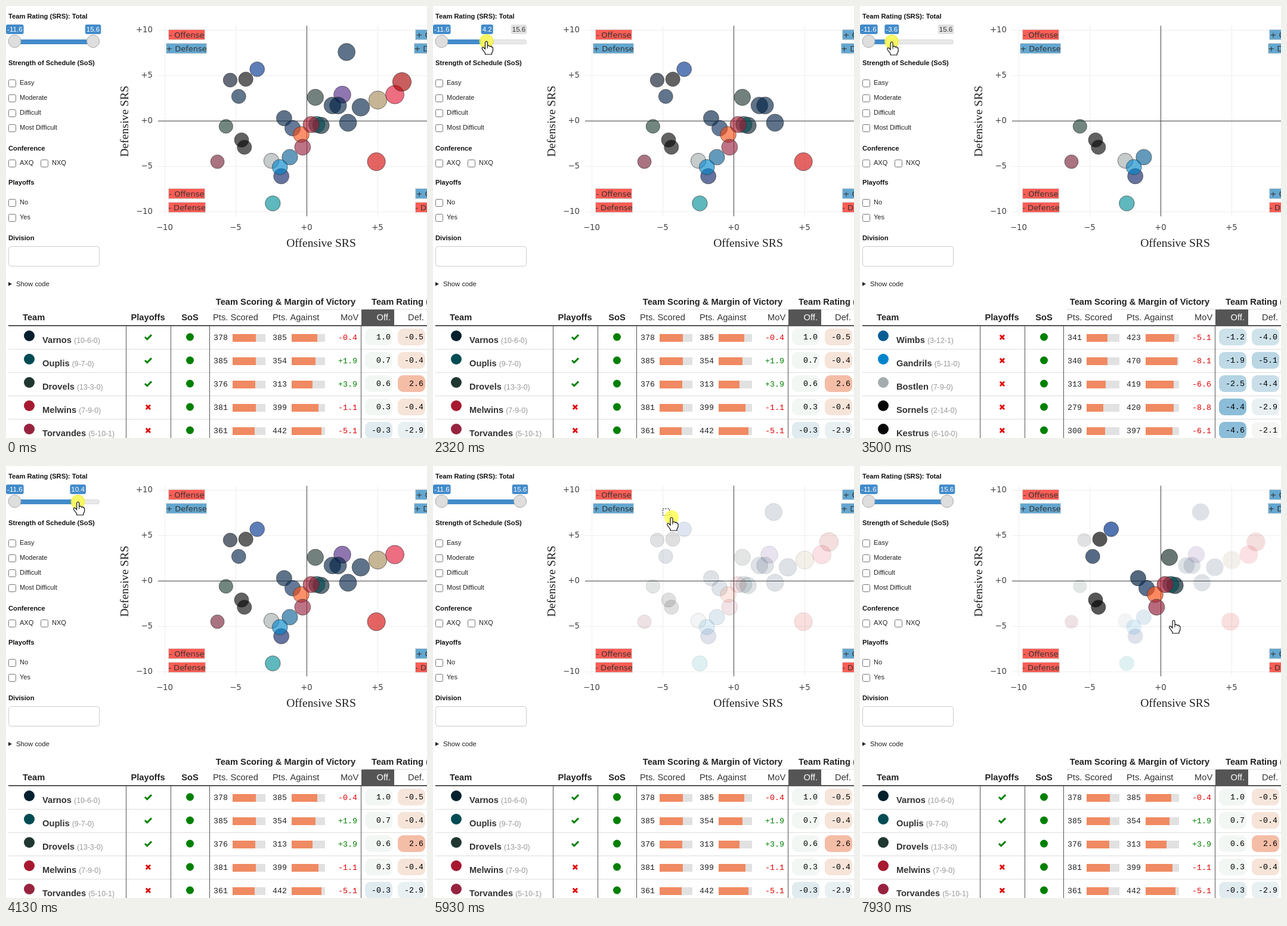
An HTML page with a canvas that plays this animation: 706 px wide and 723 px high, repeating every 8 s.

```html
<!DOCTYPE html>
<html lang="en">
<head>
<meta charset="utf-8">
<title>Team ratings</title>
<style>
html, body { margin: 0; width: 100%; height: 100%; overflow: hidden; background: #fff; }
canvas { display: block; }
</style>
</head>
<body>
<canvas id="stage" width="706" height="723"></canvas>
<script>
const ctx = document.getElementById('stage').getContext('2d');
const LOOP = 8000, MIN = -11.6, MAX = 15.6;
const SANS = '"Liberation Sans", sans-serif', SERIF = '"Liberation Serif", serif';
const MONO = '"Liberation Mono", monospace', PLOT = '"DejaVu Sans", sans-serif';

// offence, defence, colour, name, record, points scored, points against, playoffs
const teams = [
  [-3.5, 5.7, '#00338d', 'Plins'], [-4.3, 4.6, '#060606', 'Mordens'],
  [-5.4, 4.5, '#0b162a', 'Dorls'], [-4.8, 2.7, '#05254b', 'Wexlers'],
  [-5.7, -0.6, '#203f36', 'Vums', '7-9-0', 276, 359],
  [-4.6, -2.1, '#060606', 'Kestrus', '6-10-0', 300, 397],
  [-4.4, -2.9, '#060606', 'Sornels', '2-14-0', 279, 420],
  [-6.3, -4.5, '#782237'],
  [-2.5, -4.4, '#a5acaf', 'Bostlen', '7-9-0', 313, 419],
  [-1.2, -4.0, '#085d92', 'Wimbs', '3-12-1', 341, 423],
  [-1.8, -6.1, '#0b2265'],
  [-1.9, -5.1, '#0085ca', 'Gandrils', '5-11-0', 340, 470],
  [-2.4, -9.1, '#008e97'], [-1.6, 0.3, '#002244'], [-1, -0.8, '#0b2c5c'],
  [-0.4, -1.5, '#fb4f14'],
  [-0.3, -2.9, '#97233f', 'Torvandes', '5-10-1', 361, 442],
  [1, -0.5, '#03202f', 'Varnos', '10-6-0', 378, 385, true],
  [0.7, -0.4, '#004c54', 'Ouplis', '9-7-0', 385, 354, true],
  [0.3, -0.4, '#a71930', 'Melwins', '7-9-0', 381, 399],
  [0.6, 2.6, '#203731', 'Drovels', '13-3-0', 376, 313, true],
  [2.5, 2.9, '#4f2683'], [1.8, 1.7, '#002244'], [2.2, 1.7, '#002244'],
  [3.8, 1.5, '#002244'], [2.9, -0.2, '#002244'], [2.8, 7.6, '#002244'],
  [5, 2.3, '#a58c57'], [6.2, 2.9, '#e31837'], [6.7, 4.3, '#aa0000'], [4.9, -4.5, '#d50a0a']
].map(([off, def, color, name, record, scored, against, playoffs]) => ({
  off, def, color, name, record, scored, against, playoffs,
  total: off + def, x: plotX(off), y: plotY(def), r: 13.5 + off * 0.33
}));
const tableTeams = teams.filter(t => t.record).sort((a, b) => b.off - a.off);

// time, x, y
const cursorKeys = [
  [170, 679, 481], [800, 390, 152], [940, 304, 146], [1100, 197, 117], [1300, 152, 76],
  [1640, 146, 60], [1840, 146, 60], [2640, 52, 60], [2940, 29, 60], [3190, 32, 60],
  [3500, 53, 61], [3980, 98, 61], [4300, 146, 61], [4560, 150, 62], [4840, 185, 70],
  [4980, 421, 106], [5030, 403, 121], [5080, 377, 122], [5140, 368, 97], [5370, 410, 92],
  [5550, 410, 92], [5680, 399, 91], [5850, 386, 71], [6620, 519, 223], [6850, 535, 243],
  [7780, 535, 243], [7930, 526, 259]
];
const handleKeys = [[1840, 146], [2640, 54], [2900, 43.5], [3300, 43.5], [3500, 53.2], [3980, 98], [4300, 146]];
const offScale = [[-4.4, 140, 189, 216], [-1.9, 191, 218, 230], [-0.3, 223, 235, 239], [0.3, 243, 247, 244]];
const defScale = [[-5.1, 186, 214, 228], [-4, 208, 227, 234], [-2.9, 232, 240, 242], [-2.1, 245, 246, 243], [-0.5, 246, 229, 219], [2.6, 244, 189, 166]];
const hand = new Path2D('M-2 2Q0-2 2 2V8Q5 6 6 9Q9 7 9 10Q11 9 11 12V16L9 20V22H-2V20L-7 13Q-8 9-5 10L-2 13Z');
const arrow = new Path2D('M0 0V16L4 12.5L7 19L9.5 18L6.7 11.5H12Z');

function plotX(v) { return 504.5 + v * 23.8; }
function plotY(v) { return 192.3 - v * 15.17; }
const signed = v => (v < 0 ? '' : '+') + v.toFixed(1);

// Piecewise linear lookup; the first entry of each key is the position.
function sample(keys, at) {
  if (at <= keys[0][0]) return keys[0].slice(1);
  for (let i = 1; i < keys.length; i++) {
    const a = keys[i - 1], b = keys[i];
    if (at < b[0]) return a.slice(1).map((v, j) => v + (b[j + 1] - v) * (at - a[0]) / (b[0] - a[0]));
  }
  return keys[keys.length - 1].slice(1);
}

function text(s, x, y, font, color = '#222', align = 'left') {
  ctx.font = font;
  ctx.fillStyle = color;
  ctx.textAlign = align;
  ctx.fillText(s, x, y);
}
function rect(x, y, w, h, color) {
  ctx.fillStyle = color;
  ctx.fillRect(x, y, w, h);
}
function box(x, y, w, h, r, fill, stroke) {
  ctx.beginPath();
  ctx.roundRect(x, y, w, h, r);
  paint(fill, stroke);
}
function circle(x, y, r, fill, stroke) {
  ctx.beginPath();
  ctx.arc(x, y, r, 0, 7);
  paint(fill, stroke);
}
function paint(fill, stroke) {
  if (fill) { ctx.fillStyle = fill; ctx.fill(); }
  if (stroke) { ctx.strokeStyle = stroke; ctx.lineWidth = 1; ctx.stroke(); }
}
function polyline(color, width, ...pts) {
  ctx.beginPath();
  for (let i = 0; i < pts.length; i += 2) ctx.lineTo(pts[i], pts[i + 1]);
  ctx.strokeStyle = color;
  ctx.lineWidth = width;
  ctx.stroke();
}

function drawSidebar(handle, value) {
  const heads = { 'Team Rating (SRS): Total': 21, 'Strength of Schedule (SoS)': 99, Conference: 242, Playoffs: 299, Division: 392 };
  for (const label in heads) text(label, 4, heads[label], `bold 11.2px ${SANS}`, '#111');
  const checks = [['Easy', 4, 132], ['Moderate', 4, 157], ['Difficult', 4, 182], ['Most Difficult', 4, 207],
    ['AXQ', 4, 266], ['NXQ', 58, 266], ['No', 4, 332], ['Yes', 4, 357]];
  for (const [label, x, y] of checks) {
    box(x + 0.5, y - 8.5, 12, 12, 2, '#fff', '#767676');
    text(label, x + 19, y, `11px ${SANS}`);
  }
  box(4.5, 402.5, 152, 33, 4, '#fff', '#ccc');
  ctx.beginPath();
  ctx.moveTo(4, 462); ctx.lineTo(10, 465.2); ctx.lineTo(4, 468.5);
  paint('#222');
  text('Show code', 17, 469, `11.3px ${SANS}`);

  box(4.5, 56.5, 152, 7, 3, '#e8e8e8', '#dadada');
  rect(14.5, 56, handle - 14.5, 8, '#428bca');
  for (const x of [14.5, handle]) circle(x, 59, 10.5, '#dedede', '#aaa');
  const tag = (s, x, fill, color) => {
    ctx.font = `11.6px ${SANS}`;
    const w = ctx.measureText(s).width + 4;
    box(x - w / 2, 31, w, 16, 3, fill);
    text(s, x, 43, ctx.font, color, 'center');
  };
  if (handle < 118) tag('15.6', 144, '#e1e1e1', '#333');
  tag('-11.6', 14.8, '#428bca', '#fff');
  tag(value.toFixed(1), handle, '#428bca', '#fff');
}

function drawPlot(t, value) {
  for (const v of [-10, -5, 0, 5, 10]) {
    const label = (v < 0 ? '−' : '+') + Math.abs(v);
    const x = Math.round(plotX(v) - 0.5), y = Math.round(plotY(v) - 0.4);
    if (v < 10) {
      if (v) rect(x, 33, 1, 319, '#eee');
      text(label, x, 375, `13.3px ${PLOT}`, '#444', 'center');
    }
    if (v) rect(255, y, 451, 1, '#eee');
    text(label, 246, y + 4, `13.3px ${PLOT}`, '#444', 'right');
  }
  rect(255, 192, 451, 1, '#444');
  rect(504, 33, 1, 319, '#444');
  text('Offensive SRS', 528.5, 403, `19.6px ${SERIF}`, '#222', 'center');
  ctx.save();
  ctx.translate(205, 193);
  ctx.rotate(-Math.PI / 2);
  text('Defensive SRS', 0, 0, `19.6px ${SERIF}`, '#222', 'center');
  ctx.restore();

  const corner = (s, x, y, w, good) => {
    box(x + 0.5, y + 0.5, w - 1, 17, 0, good ? '#64a7d0' : '#fb5d55', '#d8d8d8');
    text(s, x + w / 2, y + 13.5, `13px ${PLOT}`, '#333', 'center');
  };
  corner('- Offense', 272, 39, 62);
  corner('+ Defense', 268, 62, 69, true);
  corner('- Offense', 272, 305, 62);
  corner('- Defense', 272, 328, 63);
  corner('+ Offense', 686, 39, 68, true);
  corner('+ Defense', 684, 62, 69, true);
  corner('+ Offense', 686, 305, 68, true);
  corner('- Defense', 686, 328, 63);

  const brushing = t >= 5930, released = t >= 7320;
  const [selX, selY] = sample(cursorKeys, Math.min(t, 6960) - 110);
  for (const p of teams) {
    if (p.total > value + 0.01) continue;
    const chosen = p.x > 385 && p.y > 71 && p.x < selX && p.y < selY;
    const dim = brushing && !chosen;
    ctx.globalAlpha = dim ? 0.13 : released ? 0.68 : 0.63;
    circle(p.x, p.y, p.r, p.color, dim && released ? null : '#333');
  }
  ctx.globalAlpha = 1;

  if (t >= 5870 && !released) {
    const [x, y] = sample(cursorKeys, t - 20);
    ctx.setLineDash([2, 2]);
    ctx.strokeStyle = '#000';
    ctx.lineWidth = 1;
    ctx.strokeRect(385.5, 71.5, Math.round(x) - 386, Math.round(y) - 72);
    ctx.setLineDash([]);
  }
}

function drawTooltip(t) {
  if (t < 240 || t > 5400) return;
  const [x, y] = sample(cursorKeys, t - 70);
  const p = teams.find(p => p.name && Math.hypot(p.x - x, p.y - y) < p.r);
  if (!p) return;
  const left = Math.round(p.x + 18), top = Math.round(p.y - 43);
  ctx.beginPath();
  ctx.moveTo(left - 6, p.y);
  ctx.lineTo(left, p.y - 6);
  ctx.lineTo(left, p.y + 6);
  paint(p.color);
  rect(left, top, 137, 86, p.color);
  text(p.name, left + 3, top + 17, `bold 16px ${SERIF}`, '#fff');
  [['Offensive SRS: ', p.off, 38], ['Defensive SRS: ', p.def, 59]].forEach(([label, v, dy]) => {
    text(label, left + 7, top + dy, `14.7px ${SERIF}`, '#fff');
    const w = ctx.measureText(label).width;
    text(signed(v), left + 7 + w, top + dy, `bold 16px ${SERIF}`, '#fff');
  });
}

function drawTable(value) {
  const bold = `bold 14.7px ${SANS}`, plain = `14.7px ${SANS}`, mono = `13.3px ${MONO}`;
  text('Team Scoring & Margin of Victory', 469, 500, bold, '#222', 'center');
  text('Team Rating (SRS)', 613, 500, bold);
  rect(347, 507, 248, 1, '#ddd');
  rect(601, 507, 105, 1, '#ddd');
  rect(596, 508, 55, 27, '#555');
  text('Team', 28, 526, bold);
  text('Playoffs', 238, 526, bold, '#222', 'center');
  text('SoS', 308.5, 526, bold, '#222', 'center');
  text('Pts. Scored', 347, 526, plain, '#333');
  text('Pts. Against', 447, 526, plain, '#333');
  text('MoV', 561, 526, plain, '#333');
  text('Off.', 645, 526, plain, '#fff', 'right');
  text('Def.', 701, 526, plain, '#333', 'right');
  rect(4, 534, 702, 2, '#555');

  const pill = (v, x, y, scale) => {
    box(x, y - 14, 46, 28, 9, `rgb(${sample(scale, v)})`);
    text(v.toFixed(1), x + 43, y + 4, mono, '#000', 'right');
  };
  const bar = (v, x, y, rate, w) => {
    text(v, x, y + 4, mono);
    rect(x + 32, y - 6, w, 13, '#e1e1e1');
    rect(x + 32, y - 6, Math.floor(v * rate), 13, '#f08a62');
  };
  tableTeams.filter(p => p.total <= value + 0.01).slice(0, 5).forEach((p, i) => {
    const y = 555 + i * 39;
    if (i) rect(4, y - 20, 702, 1, '#ddd');
    circle(39, y - 3, 9, p.color);
    text(p.name, 61, y + 9, bold, '#333');
    const w = ctx.measureText(p.name + ' ').width;
    text(`(${p.record})`, 61 + w, y + 9, `12.3px ${SANS}`, '#999');
    if (p.playoffs) polyline('#008000', 3, 233, y - 1, 236.7, y + 2.7, 244, y - 4.6);
    else {
      polyline('#e01010', 3, 234.8, y - 4.2, 242, y + 3);
      polyline('#e01010', 3, 242, y - 4.2, 234.8, y + 3);
    }
    circle(308.5, y - 1, 6.5, '#008000');
    bar(p.scored, 348, y, 0.1035, 55);
    bar(p.against, 447, y, 0.1135, 56);
    const margin = (p.scored - p.against) / 16;
    text(signed(margin), 589, y + 4, mono, margin < 0 ? '#e00000' : '#008000', 'right');
    pill(p.off, 602, y - 1, offScale);
    pill(p.def, 657, y - 1, defScale);
  });
  for (const x of [201, 276, 341, 595]) rect(x, 536, 1, 187, '#555');
}

function drawCursor(t) {
  if (t < 170) return;
  const [x, y] = sample(cursorKeys, t);
  if ((t > 1840 && t < 4300) || (t > 5850 && t < 7000)) circle(x, y - 1, 12, 'rgba(255,255,60,.75)');
  const shape = t < 1300 ? arrow : hand;
  ctx.save();
  ctx.translate(x, shape === hand ? y - 1 : y);
  ctx.fillStyle = '#fff';
  ctx.strokeStyle = '#111';
  ctx.lineWidth = 1.2;
  ctx.fill(shape);
  ctx.stroke(shape);
  if (shape === hand) polyline('#111', 1, 2, 8, 2, 12);
  ctx.restore();
}

function frame() {
  const t = performance.now() % LOOP;
  const [handle] = sample(handleKeys, t);
  const value = MIN + (handle - 14.5) / 131.5 * (MAX - MIN);
  rect(0, 0, 706, 723, '#fff');
  drawSidebar(handle, value);
  drawPlot(t, value);
  drawTooltip(t);
  drawTable(value);
  drawCursor(t);
  requestAnimationFrame(frame);
}
frame();
</script>
</body>
</html>
```
